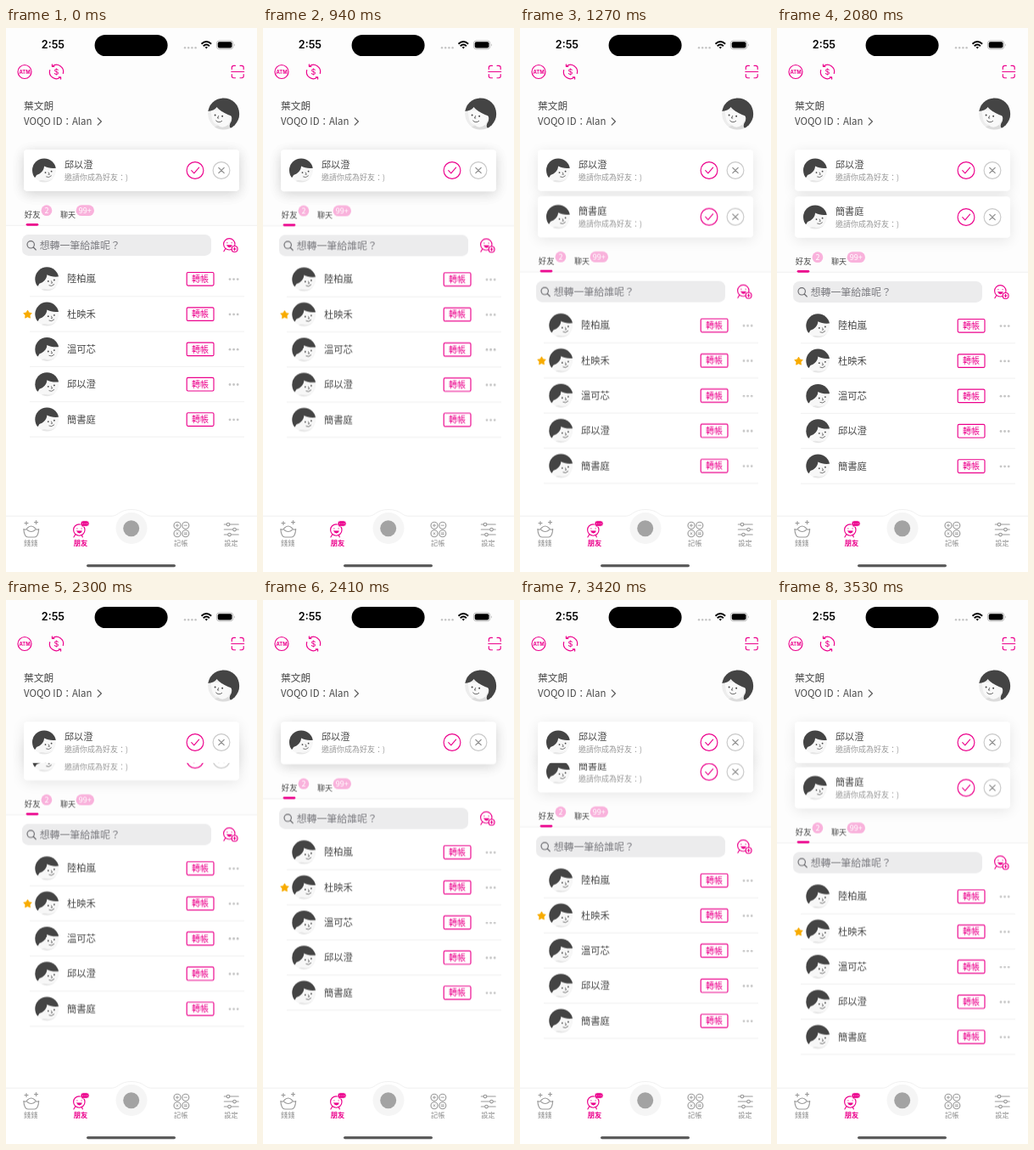
Write an HTML page that moves like this. It is 296 by 640 pixels and loops after 3580 ms.

```html
<!DOCTYPE html>
<html lang="zh-Hant">
<head>
<meta charset="utf-8">
<title>Friends</title>
<style>
  html, body { margin: 0; width: 100%; height: 100%; overflow: hidden; background: #fff; }
  svg { display: block; width: 100vw; height: 100vh; }
  text { font-family: 'Noto Sans CJK TC', 'Noto Sans CJK', 'Noto Sans', sans-serif; fill: #474747; }
  .sf { font-family: Inter, sans-serif; }
  .mid { text-anchor: middle; }
  .pink { fill: #ec008c; }
  .line { fill: none; stroke: #ec008c; stroke-width: 1.15; stroke-linecap: round; stroke-linejoin: round; }
  .gray { stroke: #999; }
  .rule { stroke: #ececec; stroke-width: .8; }
  .shadow { fill: #000; opacity: .09; filter: url(#blur); }
</style>
</head>
<body>
<svg viewBox="0 0 296 640">
  <defs>
    <filter id="blur" x="-20%" y="-80%" width="140%" height="260%"><feGaussianBlur stdDeviation="8"/></filter>
    <clipPath id="round"><circle r="14"/></clipPath>
    <clipPath id="roundBig"><circle r="18.6"/></clipPath>
    <g id="face" clip-path="url(#round)">
      <circle r="14" fill="#f7f7f7"/>
      <path d="M-8 15C-7 11-3 11 0 12C5 13 9 11 12 8L10 15Z" fill="#e6e6e6"/>
      <path d="M-15 9V-15H15V-3C9-2 4-3 0-5C0 0-4 4-9 5.5C-10 8-11 9-13 9Z" fill="#444"/>
      <g fill="#444"><circle cx="1.5" cy="2.6" r=".9"/><circle cx="8.6" cy="1.2" r=".9"/></g>
      <path d="M5.2 2.5L6.3 4.8H5M2.6 7.6Q5.5 9.4 8.4 6.4" fill="none" stroke="#555" stroke-width=".8" stroke-linecap="round"/>
    </g>
    <g id="me" clip-path="url(#roundBig)">
      <circle r="18.6" fill="#ededed"/>
      <path d="M-15-4C-14 8-12 13-6 13V19H5V13L9 6V-4Z" fill="#f9f9f9"/>
      <path d="M-19-3V-19H19V8C18 14 14 17 9 17C6 16 7 12 9 9C10 6 10 3 8 2C4 1-4-3-8-8C-10-5-14-3-19-3Z" fill="#444"/>
      <path d="M-15 19Q-10 14-6 14Q-1 18 5 13L9 19Z" fill="#dcdcdc"/>
      <g fill="#444"><circle cx="-10" cy="1.5" r="1"/><circle cx="-1.5" cy="2.8" r="1"/></g>
      <path d="M-6 2.5L-7.2 5H-5.8M-9 8Q-6 11.5-2 8.5" fill="none" stroke="#555" stroke-width=".9" stroke-linecap="round"/>
    </g>
    <g id="card">
      <rect x="21" y="143.3" width="254" height="48.4" rx="4" fill="#fff"/>
      <use href="#face" x="45" y="167.5"/>
      <text x="69" y="179" font-size="9" style="fill:#999">邀請你成為好友：)</text>
      <circle class="line" cx="223" cy="167.5" r="9.9"/>
      <path class="line" d="M218.7 167.6L221.8 170.8L227.6 164.2"/>
      <circle class="line" cx="254" cy="167.5" r="9.9" style="stroke:#c9c9c9"/>
      <path class="line" d="M250.8 164.3L257.2 170.7M257.2 164.3L250.8 170.7" style="stroke:#888"/>
    </g>
    <g id="buddy" class="line">
      <circle r="6.7"/>
      <path d="M-4.5 5.2L-6.4 8.5M3.2 6.3L4 8.5"/>
      <path class="pink" d="M-2.6 1.2H3.2Q2.4 3.7 .3 3.7Q-2 3.7-2.6 1.2Z" stroke-width=".5"/>
      <path d="M-2.4-1.8V-1.5M2.8-1.8V-1.5"/>
    </g>
  </defs>

  <rect width="296" height="640" fill="#fdfdfd"/>

  <!-- status bar -->
  <rect x="104.6" y="7.9" width="86" height="25.2" rx="12.6"/>
  <text class="sf" x="41.8" y="24.4" font-size="12.6" font-weight="600" style="fill:#000">2:55</text>
  <g fill="#c4c4c4"><circle cx="211" cy="23.3" r="1.2"/><circle cx="215.2" cy="23.3" r="1.2"/><circle cx="219.4" cy="23.3" r="1.2"/><circle cx="223.6" cy="23.3" r="1.2"/></g>
  <g fill="none" stroke="#000" stroke-width="1.9">
    <path d="M230.5 18.7Q236.3 13.3 242.1 18.7M232.7 21.2Q236.3 18 239.9 21.2"/>
    <path d="M234.6 22.6Q236.3 21.4 238 22.6L236.3 24.4Z" fill="#000" stroke="none"/>
  </g>
  <rect x="248.4" y="15" width="19.4" height="9.8" rx="3.2" fill="none" stroke="#aaa" stroke-width=".8"/>
  <rect x="249.7" y="16.3" width="16.8" height="7.2" rx="2"/>
  <path d="M269 18.4Q270.6 19.9 269 21.4Z" fill="#aaa"/>

  <!-- top actions -->
  <circle class="line" cx="22" cy="51.5" r="8"/>
  <text class="sf mid pink" x="22" y="53.7" font-size="5.8" font-weight="700">ATM</text>
  <path class="line" d="M54.6 45.1A8 8 0 0 1 67.3 53.5M64.4 57.9A8 8 0 0 1 51.7 49.5M54.4 42.9V45.3H56.8M64.6 60.1V57.7H62.2"/>
  <text class="sf mid pink" x="59.5" y="54.8" font-size="9" font-weight="500">$</text>
  <path class="line" d="M266.3 48.5V46.5Q266.3 44.3 268.5 44.3H270.5M276 44.3H278Q280.2 44.3 280.2 46.5V48.5M280.2 54.5V56.5Q280.2 58.7 278 58.7H276M270.5 58.7H268.5Q266.3 58.7 266.3 56.5V54.5M265.8 51.5H280.7"/>

  <!-- profile -->
  <text x="21" y="96.3" font-size="11.7" font-weight="500">葉文朗</text>
  <text x="21" y="114" font-size="11.4">VOQO ID：Alan</text>
  <path class="line" d="M108.2 105.8L112.4 110L108.2 114.2" style="stroke:#555"/>
  <use href="#me" x="256.6" y="101"/>

  <rect class="shadow" x="21" y="146.5" width="254" height="48.4" rx="4"/>

  <g id="slide">
    <rect class="shadow" x="21" y="146.5" width="254" height="48.4" rx="4"/>
    <use href="#card"/>
    <text x="69" y="164.6" font-size="11.1">簡書庭</text>

    <rect y="232.3" width="296" height="420" fill="#fff"/>
    <path d="M0 232.3H296" class="rule"/>
    <text x="21.8" y="222.7" font-size="9.4" font-weight="500">好友</text>
    <rect x="41.5" y="208.3" width="12.8" height="12.8" rx="6.4" fill="#f9b2dc"/>
    <text class="mid" x="47.9" y="217.9" font-size="9" style="fill:#fff">2</text>
    <text x="64" y="222.5" font-size="9">聊天</text>
    <rect x="82.6" y="208.3" width="21.4" height="12.8" rx="6.4" fill="#f9b2dc"/>
    <text class="mid" x="93.3" y="217.9" font-size="9" style="fill:#fff">99+</text>
    <rect class="pink" x="23.7" y="229.9" width="14.6" height="2.9" rx="1.45"/>

    <rect x="19" y="243" width="223" height="25" rx="7.3" fill="#ececed"/>
    <path class="line" d="M32.3 258L35.3 261" style="stroke:#6c6c70"/>
    <circle class="line" cx="29.2" cy="254.8" r="4.2" style="stroke:#6c6c70"/>
    <text x="39.7" y="260" font-size="11.9" style="fill:#7c7c81">想轉一筆給誰呢？</text>
    <use href="#buddy" x="263.3" y="254.3"/>
    <circle class="line" cx="269.6" cy="260" r="3.5" style="fill:#fff"/>
    <path class="line" d="M268 260H271.2M269.6 258.4V261.6"/>
    <g id="rows"></g>
  </g>

  <use href="#card"/>
  <text x="69" y="164.6" font-size="11.1">邱以澄</text>

  <!-- tab bar -->
  <path d="M0 574.2H125C132 574 134 566.5 148 566.5S164 574 171 574.2H296V640H0Z" fill="#fff"/>
  <path class="rule" d="M0 574.2H125C132 574 134 566.5 148 566.5S164 574 171 574.2H296" fill="none"/>
  <circle cx="148" cy="588.5" r="18.5" fill="#f5f5f5"/>
  <circle cx="147.7" cy="588.7" r="9.5" fill="#a3a3a3"/>
  <g class="line gray">
    <path d="M20.8 589.5Q24 591 25 588.5Q29.7 583.5 34.4 588.5Q35.5 591 38.7 589.5Q38 599 33.5 599H26Q21.5 599 20.8 589.5ZM25 590.5Q29.7 594.5 34.4 590.5"/>
    <path d="M24 580.5V584.5M22 582.5H26M35.5 579.5V583.5M33.5 581.5H37.5"/>
    <path d="M257.3 584H274.2M257.3 590H274.2M257.3 596H274.2"/>
    <g fill="#fff"><circle cx="262" cy="584" r="1.8"/><circle cx="269.5" cy="590" r="1.8"/><circle cx="263.5" cy="596" r="1.8"/></g>
    <circle cx="202" cy="585.2" r="4"/><circle cx="211.8" cy="585.2" r="4"/>
    <circle cx="202" cy="594.7" r="4"/><circle cx="211.8" cy="594.7" r="4"/>
    <path d="M200.4 585.2H203.6M202 583.6V586.8M210.2 585.2H213.4M200.9 593.6L203.1 595.8M203.1 593.6L200.9 595.8M210.2 593.9H213.4M210.2 595.6H213.4" stroke-width=".9"/>
  </g>
  <use href="#buddy" x="86.3" y="590.5"/>
  <path class="pink" d="M91 579.7H95Q98.2 579.7 98.2 583T95 586.3H91.5L89.3 587.8V586Q87.9 585.2 87.9 583Q87.9 579.7 91 579.7Z" stroke="#fff" stroke-width=".8"/>
  <path d="M90.6 583H95.9" stroke="#fff" stroke-width="1.1" stroke-linecap="round" stroke-dasharray="0 2.5"/>
  <g id="labels"></g>
  <rect x="95" y="630.9" width="105" height="3.4" rx="1.7" fill="#5c5c5c"/>
</svg>

<script>
  const get = id => document.getElementById(id);
  const loop = 3580;

  // [time in ms, downward shift of the second card and the list]
  const steps = [
    [0, 0], [940, .4], [1050, 14.3], [1160, 39.8], [1270, 54.6],
    [2080, 55], [2190, 45.4], [2300, 20.4], [2410, 1.5],
    [3200, .1], [3310, 9.6], [3420, 34.6], [3530, 53.5], [loop, 53.5]
  ];

  const starPath = (x, y, r) => 'M' + Array.from({ length: 10 }, (_, i) => {
    const a = (i / 5 - .5) * Math.PI, k = i % 2 ? r * .54 : r;
    return `${(x + k * Math.cos(a)).toFixed(2)} ${(y + k * Math.sin(a)).toFixed(2)}`;
  }).join('L') + 'Z';

  const row = (name, i) => `<g transform="translate(0 ${295.3 + 41.3 * i})">
    <use href="#face" x="48.3"/>
    <text x="72" y="4.1" font-size="11.3">${name}</text>
    <rect class="line" x="213.2" y="-7.8" width="31.8" height="15.6" rx="1.5"/>
    <text class="mid pink" x="229.1" y="3.7" font-size="10" font-weight="500">轉帳</text>
    ${[264, 268.6, 273.2].map(x => `<circle cx="${x}" cy=".3" r="1.4" fill="#c6c6c6"/>`).join('')}
    <path class="rule" d="M28 20.5H281"/>
    ${i === 1 ? `<path d="${starPath(25.5, .5, 5)}" fill="#f8ab00" stroke="#f8ab00" stroke-linejoin="round" stroke-width=".8"/>` : ''}
  </g>`;

  get('rows').innerHTML = ['陸柏嵐', '杜映禾', '溫可芯', '邱以澄', '簡書庭'].map(row).join('');

  get('labels').innerHTML = [['錢錢', 29.3], ['朋友', 88], ['記帳', 206.3], ['設定', 265.4]]
    .map(([word, x], i) => `<text class="mid" x="${x}" y="608.5" font-size="8.2" font-weight="${i === 1 ? 700 : 400}"
      style="fill:${i === 1 ? '#ec008c' : '#8e8e8e'}">${word}</text>`).join('');

  get('slide').animate(
    steps.map(([t, y]) => ({ offset: t / loop, transform: `translateY(${y}px)`, easing: 'step-end' })),
    { duration: loop, iterations: Infinity }
  );
</script>
</body>
</html>
```
